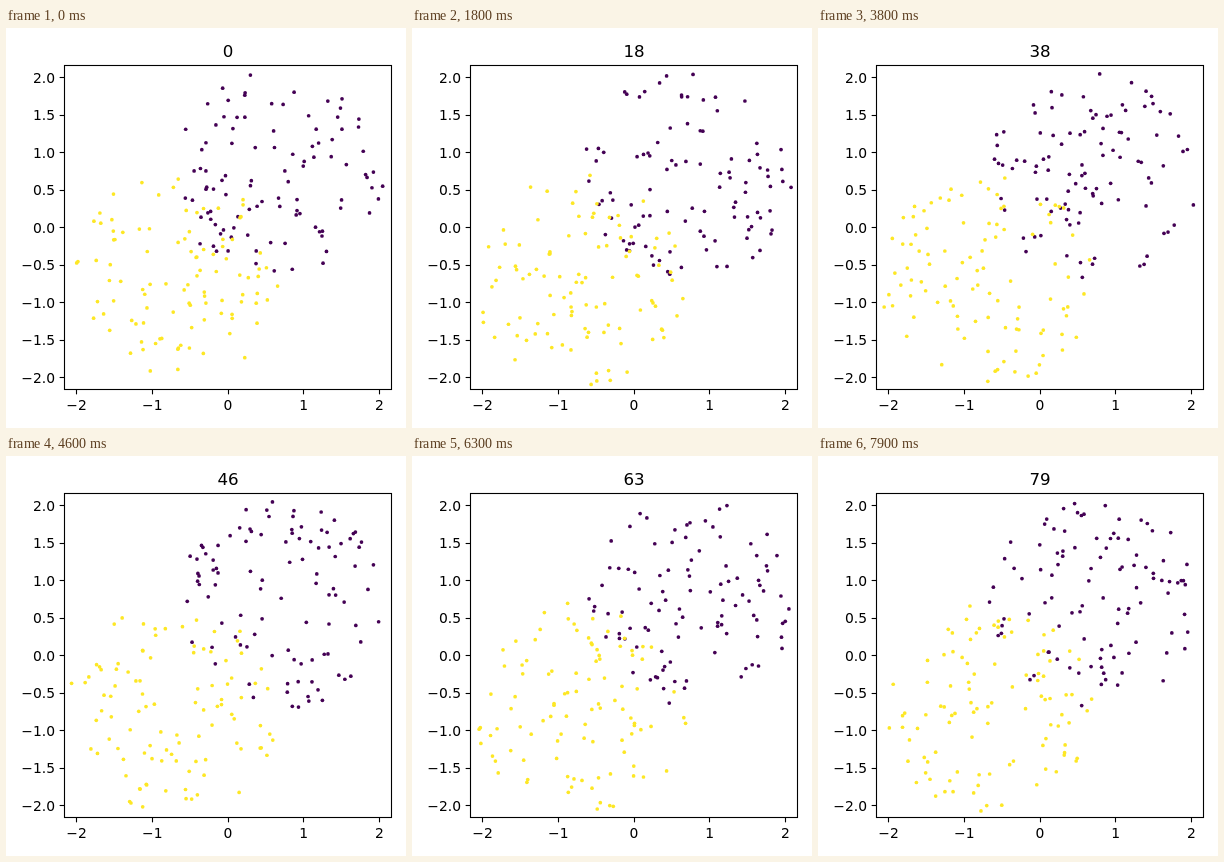
An HTML page for the animation above (8 s loop, 400 by 400 pixels).

```html
<!DOCTYPE html>
<html lang="en">
<head>
<meta charset="utf-8">
<title>Two discs</title>
<style>
  html, body { margin: 0; width: 100%; height: 100%; overflow: hidden; background: #fff; }
  svg { display: block; width: 400px; height: 400px; }
  text { font: 13.89px "DejaVu Sans", Verdana, sans-serif; fill: #000; }
  .title { font-size: 16.67px; }
  .axes { fill: none; stroke: #000; stroke-width: 1.11; }
</style>
</head>
<body>
<svg viewBox="0 0 400 400">
  <rect width="400" height="400" fill="#fff"/>
  <g id="dots"></g>
  <rect class="axes" x="58.5" y="37.5" width="327" height="324"/>
  <g id="ticks"></g>
  <text id="title" class="title" x="222" y="29" text-anchor="middle">0</text>
</svg>
<script>
const STEP = 100, STEPS = 80, PER_DISC = 100, RADIUS = 1.41;
const DISCS = [
  { center: 0.7, color: '#440154' },
  { center: -0.7, color: '#fde725' }
];
const px = x => 222 + x * 75.7;
const py = y => 199.5 - y * 75;
const $ = id => document.getElementById(id);

function add(parent, tag, attrs, text = '') {
  const el = document.createElementNS('http://www.w3.org/2000/svg', tag);
  for (const key in attrs) el.setAttribute(key, attrs[key]);
  el.textContent = text;
  parent.append(el);
  return el;
}

function seeded(seed) {
  return () => {
    seed = (seed + 0x6D2B79F5) | 0;
    let t = Math.imul(seed ^ (seed >>> 15), 1 | seed);
    t = (t + Math.imul(t ^ (t >>> 7), 61 | t)) ^ t;
    return ((t ^ (t >>> 14)) >>> 0) / 4294967296;
  };
}

function drawTicks() {
  const label = (v, digits) => v.toFixed(digits).replace('-', '\u2212');
  for (let v = -2; v <= 2; v++) {
    const x = Math.floor(px(v)) + 0.5;
    add($('ticks'), 'path', { class: 'axes', d: `M${x} 361.5v4.86` });
    add($('ticks'), 'text', { x: px(v), y: 382, 'text-anchor': 'middle' }, label(v, 0));
  }
  for (let v = -2; v <= 2; v += 0.5) {
    const y = Math.floor(py(v)) + 0.5;
    add($('ticks'), 'path', { class: 'axes', d: `M58.5 ${y}h-4.86` });
    add($('ticks'), 'text', { x: 49, y: py(v) + 5.2, 'text-anchor': 'end' }, label(v, 1));
  }
}

const dots = DISCS.flatMap(({ center, color }) =>
  Array.from({ length: PER_DISC }, () => ({
    center,
    el: add($('dots'), 'circle', { r: 1.85, fill: color })
  })));

// Each step draws a fresh uniform sample from both discs.
function show(step) {
  const random = seeded(step * 7919 + 11);
  for (const { center, el } of dots) {
    const r = RADIUS * Math.sqrt(random());
    const angle = 2 * Math.PI * random();
    el.setAttribute('cx', px(center + r * Math.cos(angle)).toFixed(2));
    el.setAttribute('cy', py(center + r * Math.sin(angle)).toFixed(2));
  }
  $('title').textContent = step;
}

drawTicks();
show(0);
let shown = 0;
const start = performance.now();
function tick() {
  const step = Math.floor((performance.now() - start) / STEP) % STEPS;
  if (step !== shown) show(shown = step);
  requestAnimationFrame(tick);
}
requestAnimationFrame(tick);
</script>
</body>
</html>
```
